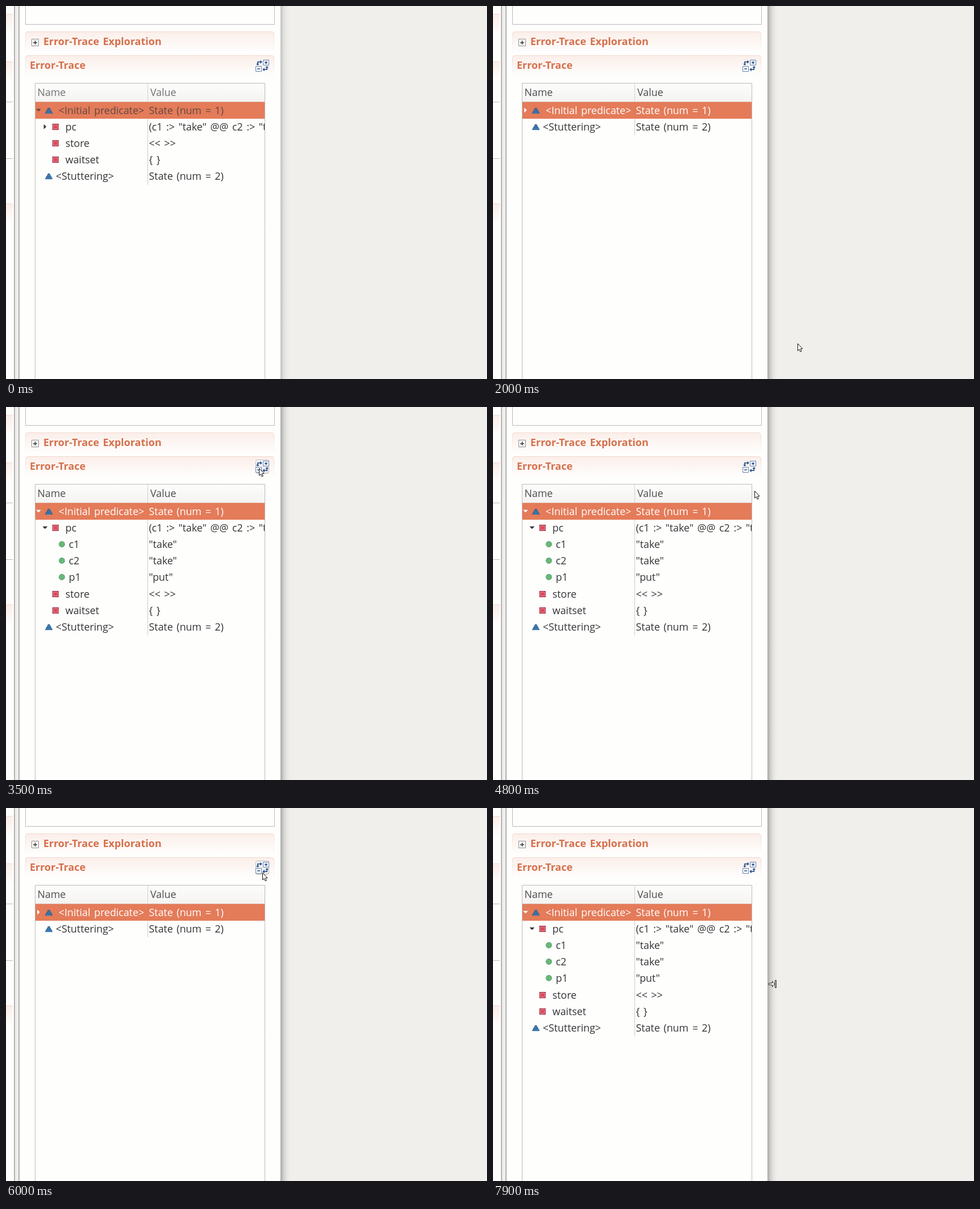
These frames come from a looping animation (850x659 px, 8000 ms). An HTML page with a canvas:

```html
<!DOCTYPE html>
<html lang="en">
<head>
<meta charset="utf-8">
<title>Error-Trace tree</title>
<style>
  html, body { margin: 0; width: 100%; height: 100%; overflow: hidden; background: #f0efec; }
  canvas { display: block; }
</style>
</head>
<body>
<canvas id="stage" width="850" height="659"></canvas>
<script>
const ctx = document.getElementById('stage').getContext('2d');
const LOOP = 8000, STEP = 100, ROW = 29.2, TOP = 170;
const FOCUS = 1100, UNHOVER = 7300, RESIZE = 7500;
const INK = '#333435', PAPER = '#fefefd', GREY = '#bcbbb9', NAVY = '#234a86';

// Pointer glides: start, number of steps, destination
const glides = [
  [200, 1, 380, 541], [300, 2, 259, 208], [600, 2, 457, 108], [900, 2, 455, 105],
  [1200, 3, 543, 609], [2000, 1, 538, 596], [2100, 3, 517, 473], [2500, 3, 256, 214],
  [2900, 4, 447, 108], [4700, 4, 477, 187], [5100, 4, 453, 114], [6600, 2, 453, 109],
  [RESIZE, 1, 484, 212], [7700, 3, 494, 311]
];
const trees = [[0, 'partial'], [FOCUS, 'closed'], [3500, 'open'], [6000, 'closed'], [7300, 'open']];

function pointerAt(t) {
  let x = -50, y = -50;
  for (const [start, steps, toX, toY] of glides) {
    if (t < start) break;
    const p = Math.min(1, (Math.floor((t - start) / STEP) + 1) / steps);
    x += (toX - x) * p;
    y += (toY - y) * p;
  }
  return { x: Math.round(x), y: Math.round(y) };
}

function rect(x, y, w, h, color) {
  ctx.fillStyle = color;
  ctx.fillRect(x, y, w, h);
}

function fade(x0, y0, x1, y1, ...colors) {
  const g = ctx.createLinearGradient(x0, y0, x1, y1);
  colors.forEach((c, i) => g.addColorStop(i / (colors.length - 1), c));
  return g;
}

function text(str, x, y, color = INK, font = '17.9px') {
  ctx.font = font + ' "Open Sans", sans-serif';
  ctx.wordSpacing = '2px';
  ctx.fillStyle = color;
  ctx.fillText(str, x, y);
}

function paint(fill, stroke) {
  if (fill) { ctx.fillStyle = fill; ctx.fill(); }
  if (stroke) { ctx.strokeStyle = stroke; ctx.lineWidth = 1; ctx.stroke(); }
}

function shape(points, fill, stroke) {
  ctx.beginPath();
  points.forEach(([x, y]) => ctx.lineTo(x, y));
  ctx.closePath();
  paint(fill, stroke);
}

function box(x, y, w, h, stroke, fill, radius = 0) {
  ctx.beginPath();
  ctx.roundRect(x + .5, y + .5, w - 1, h - 1, radius);
  paint(fill, stroke);
}

// Triangle of half-width r, turned by quarter turns from pointing right
function triangle(x, y, r, quarters, color) {
  ctx.save();
  ctx.translate(x, y);
  ctx.rotate(quarters * Math.PI / 2);
  shape([[-r / 2, -r], [-r / 2, r], [r / 2, 0]], color);
  ctx.restore();
}

function sectionHeader(y, title, x) {
  const edge = fade(0, y, 0, y + 38, '#f2d8ce', PAPER);
  box(34, y, 440, 39, edge, fade(0, y, 0, y + 36, '#fbeee9', PAPER), [4, 4, 0, 0]);
  text(title, x, y + 23.5, '#d5704c', 'bold 18px');
}

function drawWindow(focused) {
  rect(0, 0, 850, 659, '#f0efec');
  const shadow = focused ? ['#aaa9a7', '#d3d2cf', '#e9e8e5'] : ['#c2c1bf', '#e2e1de', '#edece9'];
  rect(485, 0, 18, 659, fade(485, 0, 503, 0, ...shadow, '#f0efec'));
  rect(0, 0, 485, 659, PAPER);

  for (const y of [14, 98, 349]) {
    rect(0, y, 12, 36, fade(0, y, 0, y + 36, '#fbeee9', PAPER));
    rect(0, y, 12, 1, '#f2d8ce');
  }
  for (const y of [169, 269]) rect(0, y, 12, 1, GREY);
  rect(14, 0, 10, 659, '#f0efed');
  for (const x of [14, 22]) rect(x, 0, 2, 659, '#b2b1af');

  box(34, -5, 441, 38, GREY);
  sectionHeader(45, 'Error-Trace Exploration', 66);
  sectionHeader(87, 'Error-Trace', 42);
  box(45, 58, 13, 13, '#8c8a88', '#fff');
  rect(48, 64, 7, 1.5, INK);
  rect(50.8, 61, 1.5, 7, INK);
}

// A box and an elbow arrow, repeated half a turn round the centre
function drawButton(hovered, pressed) {
  if (hovered) {
    box(441, 93, 24, 25, '#bdb9b5', pressed ? '#e7e6e4' : fade(0, 94, 0, 118, '#fbfbfa', '#e9e8e6'), 3);
  }
  ctx.save();
  ctx.translate(453, 105.5);
  for (const plus of [true, false]) {
    box(1, -10.5, 11, 10, '#5e7fb0', '#fff');
    rect(4, -6.3, 5, 1.5, NAVY);
    if (plus) rect(5.8, -8, 1.5, 5, NAVY);
    rect(-9, -7.5, 6, 1.6, NAVY);
    rect(-9, -7.5, 1.6, 5, NAVY);
    triangle(-2, -6.7, 3.2, 0, NAVY);
    triangle(-8.2, -2, 2.8, 1, NAVY);
    ctx.rotate(Math.PI);
  }
  ctx.restore();
}

const icons = {
  state(x, y) {
    for (let i = 0; i < 4; i++) {
      const w = 4 + i * 2.8, top = y - 4.5 + i * 2.5;
      rect(x - w / 2, top, w, 2.6, '#234f7c');
      rect(x - w / 2 + 1, top + .5, w - 2, 1.7, '#3a84c1');
    }
  },
  variable(x, y) {
    rect(x - 5.5, y - 5.5, 11, 11, '#a3233a');
    rect(x - 4.2, y - 4.2, 8.4, 8.4, '#f0a4ac');
    rect(x - 3.2, y - 3.2, 6.4, 6.4, '#da4658');
  },
  value(x, y) {
    ctx.beginPath();
    ctx.arc(x, y, 5, 0, 7);
    ctx.setLineDash([2, 1]);
    paint('#66b878', '#32804a');
    ctx.setLineDash([]);
  }
};

function rowsFor(mode) {
  const state = (label, x, value, open) =>
    ({ icon: 'state', iconX: 75.7, label, x, value, arrowX: 57.5, open });
  const variable = (label, value, open) =>
    ({ icon: 'variable', iconX: 87.5, label, x: 105, value, arrowX: 69, open });
  const entry = (label, value) => ({ icon: 'value', iconX: 98.7, label, x: 111, value });

  const entries = [entry('c1', '"take"'), entry('c2', '"take"'), entry('p1', '"put"')];
  const variables = [
    variable('pc', '(c1 :> "take" @@ c2 :> "take" @@ p1 :> "put")', mode === 'open'),
    ...(mode === 'open' ? entries : []),
    variable('store', '<< >>'),
    variable('waitset', '{ }')
  ];
  return [
    state('<Initial predicate>', 93, 'State (num = 1)', mode !== 'closed'),
    ...(mode === 'closed' ? [] : variables),
    state('<Stuttering>', 88, 'State (num = 2)')
  ];
}

function drawTable(mode, focused) {
  const rows = rowsFor(mode);
  const headColor = focused ? '#4b4c4d' : '#707172';
  box(51, 136, 407, 540, GREY);
  rect(52, 137, 405, 32, fade(0, 136, 0, 170, '#fdfdfc', '#f4f3f1'));
  rect(52, 169, 405, 1, '#d5d3d0');
  rect(250, 137, 1, 33, '#d5d3d0');
  text('Name', 55.5, 159, headColor);
  text('Value', 255, 159, headColor);

  rect(52, TOP - .5, 405, 29.7, '#e47b59');
  rect(250, TOP + 29, 1, ROW * (rows.length - 1), '#dac8be');
  ctx.save();
  ctx.beginPath();
  ctx.rect(52, TOP, 405, 489);
  ctx.clip();
  rows.forEach((row, i) => {
    const y = TOP + 14.5 + i * ROW;
    const color = i ? INK : focused ? '#fff' : '#604943';
    icons[row.icon](row.iconX, Math.round(y) - .5);
    if (row.open !== undefined) triangle(row.arrowX, y - .5, 4.5, row.open ? 1 : 0, color);
    text(row.label, row.x, y + 6, color);
    text(row.value, 252.5, y + 6, color);
  });
  ctx.restore();
}

function drawPointer({ x, y }, resizing) {
  ctx.save();
  ctx.translate(x, y);
  if (resizing) {
    shape([[-6.5, -1.5], [-.5, -1.5], [-.5, -5], [4, 0], [-.5, 5], [-.5, 1.5], [-6.5, 1.5]], '#fff', '#222');
    box(4, -7, 3, 14, '#222', '#fff');
  } else {
    shape([[.5, .5], [.5, 13], [3.3, 10.5], [5.2, 15], [7.3, 14], [5.4, 9.8], [9, 9.5]], '#fff', '#111');
  }
  ctx.restore();
}

function draw(now) {
  const t = now % LOOP;
  const focused = t >= FOCUS;
  const pointer = pointerAt(t);
  const overButton = pointer.x > 440 && pointer.x < 465 && pointer.y > 93 && pointer.y < 118;
  const [, mode] = trees.findLast(([start]) => start <= t);
  drawWindow(focused);
  drawButton(overButton && t < UNHOVER, t >= 7000);
  drawTable(mode, focused);
  drawPointer(pointer, t >= RESIZE);
}

const start = performance.now();
function tick() {
  draw(performance.now() - start);
  requestAnimationFrame(tick);
}
tick();
</script>
</body>
</html>
```
